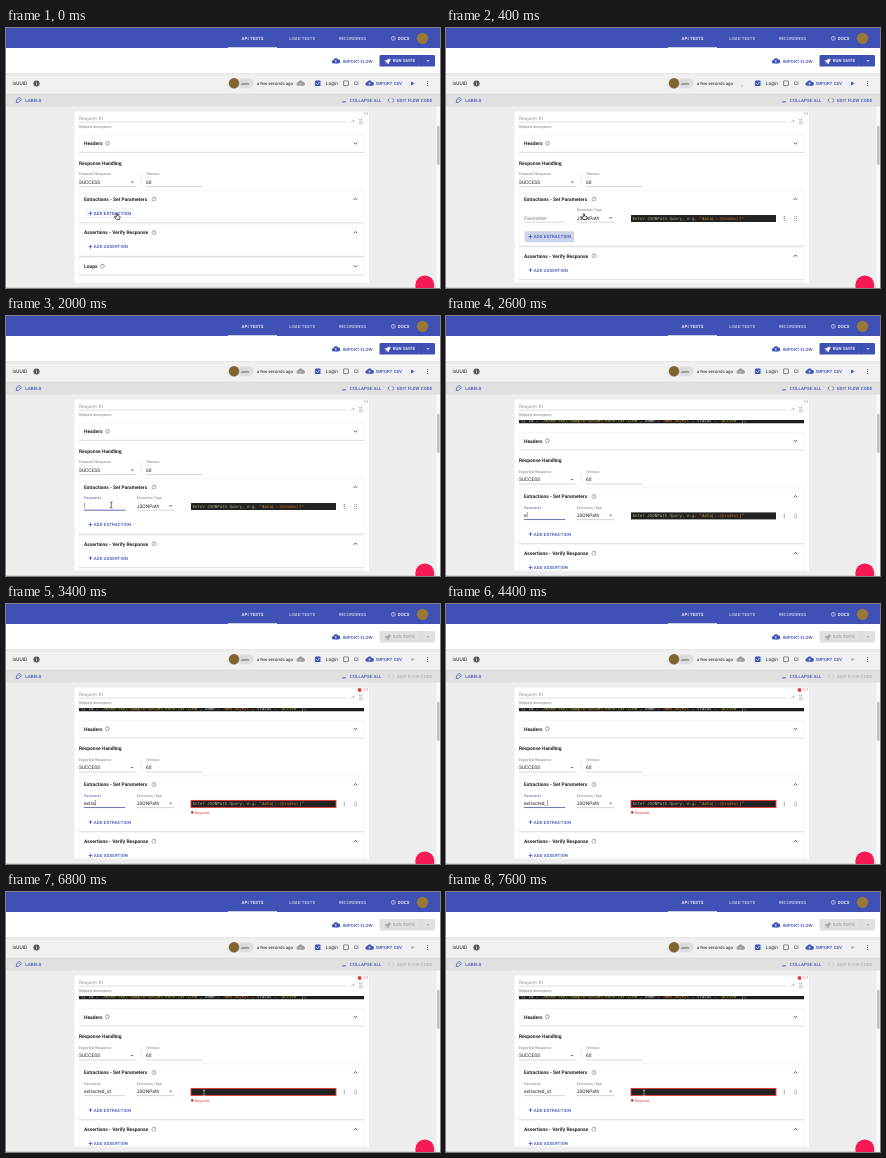
An HTML page that plays this animation: 434 px wide and 260 px high, repeating every 8000 ms.

```html
<!DOCTYPE html>
<html lang="en">
<head>
<meta charset="utf-8">
<title>API test editor</title>
<style>
html, body { margin: 0; width: 100%; height: 100%; overflow: hidden; background: #eee; }
svg { display: block; width: 434px; height: 260px; font-family: Roboto, "Liberation Sans", sans-serif; }
text { white-space: pre; text-rendering: geometricPrecision; }
.btn { font-size: 4.35px; font-weight: 500; letter-spacing: .12px; }
.body { font-size: 4.85px; letter-spacing: .04px; }
.head { font-size: 4.9px; font-weight: 700; }
.note { font-size: 4.35px; }
.label { font-size: 3.6px; letter-spacing: .03px; }
.code { font: 4.12px "DejaVu Sans Mono", "Liberation Mono", monospace; }
</style>
</head>
<body>
<svg id="stage" viewBox="0 0 434 260"></svg>
<script>
const BLUE = '#3f51b5', INK = '#222', GRAY = '#777', RED = '#e53935';
const LOOP = 8000, STEP = 200, ROW_SHIFT = 23.3, PREVIEW_SHIFT = 9.4;
const WORD = 'extracted_id';
const SIZES = { btn: 4.35, body: 4.85, head: 4.9, note: 4.35, label: 3.6, code: 4.12 };

// Text is placed by its left edge and the middle of its capitals.
const text = (cls, x, y, s, fill = INK, extra = '') =>
  `<text class="${cls}" x="${x}" y="${(y + SIZES[cls] * .355).toFixed(2)}" fill="${fill}" ${extra}>${s}</text>`;
const rect = (x, y, w, h, fill, extra = '') =>
  `<rect x="${x}" y="${y}" width="${w}" height="${h}" fill="${fill}" ${extra}/>`;
const path = (d, color, width = .8, extra = '') =>
  `<path d="${d}" fill="none" stroke="${color}" stroke-width="${width}" ${extra}/>`;
const fillPath = (d, fill, extra = '') => `<path d="${d}" fill="${fill}" ${extra}/>`;
const circle = (x, y, r, fill, extra = '') => `<circle cx="${x}" cy="${y}" r="${r}" fill="${fill}" ${extra}/>`;
const group = (id, content, extra = '') => `<g id="${id}" ${extra}>${content}</g>`;

const rule = (x1, x2, y, color = '#999') => path(`M${x1} ${y}H${x2}`, color, .4);
const chevron = (x, y, up) => path(`M${x - 1.7} ${y + (up ? .9 : -.9)}l1.7 ${up ? -1.8 : 1.8}l1.7 ${up ? 1.8 : -1.8}`, '#333', .8);
const dropArrow = (x, y, fill = '#666') => fillPath(`M${x - 1.5} ${y - .7}h3l-1.5 1.6z`, fill);
const play = (x, y, fill) => fillPath(`M${x - 1.4} ${y - 2}l3.4 2l-3.4 2z`, fill);
const rocket = (x, y, fill) =>
  fillPath(`M${x + 2.4} ${y - 2.4}q-2.2 0-3.4 1.5l-1.4.1l-.8 1.3l1.5.3l1.2 1.2l.3 1.5l1.3-.8l.1-1.4q1.4-1.2 1.2-3.7z`, fill) +
  path(`M${x - 2.3} ${y + 2.3}l1.3-1.3`, fill, .8);
const dots = (xs, x, y, fill = '#555') =>
  xs.map(dx => [-1.9, 0, 1.9].map(dy => circle(x + dx, y + dy, .5, fill)).join('')).join('');
const kebab = (x, y) => dots([0], x, y, '#333');
const grip = (x, y) => dots([-.8, .8], x, y, '#777');
const help = (x, y, color = '#666') =>
  circle(x, y, 2, 'none', `stroke="${color}" stroke-width=".5"`) +
  text('label', x, y, '?', color, 'text-anchor="middle"');
const cloud = (x, y, fill, mark) =>
  fillPath(`M${x - 2.2} ${y + 2.4}a1.7 1.7 0 0 1-.2-3.4a2.6 2.6 0 0 1 4.8-.4a1.9 1.9 0 0 1 .3 3.8z`, fill) +
  path(`M${x} ${y}${mark}`, '#fff', .6);
const uploadCloud = (x, y) => cloud(x, y, BLUE, 'm0 1.6v-2.3m-1 1l1-1l1 1');
const plus = (x, y) => path(`M${x - 2} ${y}h4m-2-2v4`, BLUE, .75);
const checkbox = (x, y, on) => on
  ? rect(x - 2.7, y - 2.7, 5.4, 5.4, BLUE, 'rx=".6"') + path(`M${x - 1.6} ${y}l1.2 1.2l2.2-2.5`, '#fff', .7)
  : rect(x - 2.4, y - 2.4, 4.8, 4.8, 'none', 'rx=".4" stroke="#555" stroke-width=".7"');
const panel = (y, h, id = '') =>
  rect(73, y + .7, 285, h, '#cfcfcf', id && `id="${id}Shade"`) +
  rect(73, y, 285, h, '#fff', `stroke="#e8e8e8" stroke-width=".4" ${id && `id="${id}"`}`);
const heading = (y, s, helpX, up) => text('head', 78, y, s) + help(helpX, y) + chevron(349.5, y, up);
const addButton = (y, s) => plus(84.5, y) + text('btn', 87.7, y, s, BLUE);

const chrome = () =>
  rect(0, 0, 434, 260, '#eee') +
  rect(0, 0, 434, 20, BLUE) + rect(222, 19, 49, 1, '#c5cbe9') +
  text('btn', 246.5, 10.3, 'API TESTS', '#fff', 'text-anchor="middle"') +
  text('btn', 296.3, 10.3, 'LOAD TESTS', '#c9cfec', 'text-anchor="middle"') +
  text('btn', 346.5, 10.3, 'RECORDINGS', '#c9cfec', 'text-anchor="middle"') +
  help(387.3, 10.3, '#fff') + text('btn', 391.8, 10.3, 'DOCS', '#fff') + circle(416.5, 10.3, 5.6, '#9a7838') +
  rect(0, 20, 434, 25.5, '#fff') +
  uploadCloud(329.8, 33) + text('btn', 336.7, 33, 'IMPORT FLOW', BLUE) +
  rect(0, 45.5, 434, 20.5, '#f0f0f0') + rule(0, 434, 45.7, '#d4d4d4') +
  text('body', 6.6, 55.5, 'isUUID') + circle(30.5, 55.5, 3, '#555') +
  path('M30.5 55.1v2.1m0-3.5v.7', '#fff', .7) +
  rect(231.5, 50.5, 16, 9.8, '#dcdcdc', 'rx="4.9"') +
  circle(228, 55.3, 5.2, '#80642f') + text('label', 234.7, 55.4, 'Jorin', '#333') +
  text('note', 250.7, 55.4, 'a few seconds ago') +
  group('saved', cloud(294.5, 55.3, '#9a9a9a', 'm-1.1 .6l.8.8l1.5-1.6')) +
  group('saving', rect(295, 57.8, 1.5, .6, '#777')) +
  checkbox(311.8, 55.3, true) + text('body', 319.8, 55.4, 'Login') +
  checkbox(340, 55.3, false) + text('body', 348, 55.4, 'CI') +
  uploadCloud(363.5, 55.3) + text('btn', 369.8, 55.4, 'IMPORT CSV', BLUE) + kebab(421.5, 55.4) +
  rect(0, 66, 434, 12.5, '#e0e0e0') + rule(0, 434, 66, '#d2d2d2') +
  path('M10.2 74.5l.4-2.6l2.6-2.6l2.3 2.3l-2.7 2.6z', BLUE, .7) + circle(13.1, 71.5, .5, BLUE) +
  text('btn', 19.3, 72.3, 'LABELS', BLUE) +
  rect(336, 73.5, 4, .8, BLUE) + text('btn', 344, 72.3, 'COLLAPSE ALL', BLUE) +
  rect(430.5, 78.5, 3.5, 181.5, '#f8f8f8') + rect(431, 98, 2.6, 39, '#c1c1c1', 'rx="1.2"');

const runControls = (id, fill, ink, link) => group(id,
  rect(373.5, 27, 55.5, 11.6, fill, 'rx="1.2"') + path('M415.3 27v11.6', id === 'ready' ? '#2f3d90' : '#c4c4c4', .4) +
  rocket(382, 32.8, ink) + text('btn', 386.7, 32.9, 'RUN SUITE', ink) + dropArrow(422, 32.9, ink) +
  play(406.5, 55.4, link) +
  path('M383.8 70.4l-2 1.9l2 1.9m2.4-3.8l2 1.9l-2 1.9', link, .7) +
  text('btn', 391, 72.3, 'EDIT FLOW CODE', link));

const extractionRow = () => group('row',
  text('body', 78, 190, 'Parameter', '#777', 'id="hint"') +
  text('label', 78, 182.2, 'Parameter', BLUE, 'id="paramLabel"') +
  text('body', 78, 189.8, '', INK, 'id="value"') +
  rect(78.2, 186.6, .4, 5.8, INK, 'id="caret"') +
  rule(78, 119, 194.2) + rect(78, 193.8, 41.3, .7, BLUE, 'id="focusLine"') +
  text('label', 130.7, 182.2, 'Extraction Type', GRAY) + text('body', 130.7, 189.8, 'JSONPath') +
  dropArrow(164.7, 190) + rule(130.7, 168, 194.2) +
  rect(185, 187, 145, 7, '#222', 'id="editor"') +
  text('code', 186.5, 190.6, 'Enter JSONPath Query, e.g. <tspan fill="#c99a3d">"data[</tspan><tspan fill="#d0702f">::(@index)</tspan><tspan fill="#c99a3d">]"</tspan>', '#b3aa86', 'id="query"') +
  group('required', circle(186.3, 199, 1.3, RED) + text('label', 188.8, 199, 'Required', RED)) +
  kebab(338.2, 190.5) + grip(349.6, 190.5));

const form = () => group('lower',
  panel(107, 17) + heading(115.4, 'Headers', 101.5, false) +
  text('head', 73, 135.2, 'Response Handling') +
  text('label', 73, 146.2, 'Expected Response', GRAY) + text('body', 73, 154.2, 'SUCCESS') +
  dropArrow(126.3, 154.3) + rule(73, 130.5, 158.6) + path('M135.3 146v13', '#ddd', .5) +
  text('label', 140, 146.2, 'Timeout', GRAY) + text('body', 140, 154.2, '60') + rule(140, 197, 158.6) +
  panel(162.5, 32, 'extraction') + heading(171, 'Extractions - Set Parameters', 148, true) +
  extractionRow() +
  group('after',
    rect(78.5, 179.9, 49.5, 11, BLUE, 'rx="1" id="ripple"') + addButton(185.3, 'ADD EXTRACTION') +
    panel(196, 32) + heading(204.5, 'Assertions - Verify Response', 148, true) + addButton(218.7, 'ADD ASSERTION') +
    panel(229.7, 17) + heading(238.2, 'Loops', 96.5, false)));

const card = () =>
  `<clipPath id="view"><path d="M0 78.5h430v176.2H0z"/></clipPath><clipPath id="strip"><path d="M73 104h285v3.5H73z"/></clipPath>` +
  `<g clip-path="url(#view)">` +
  rect(68, 83, 295.5, 176, '#fff', 'stroke="#ddd" stroke-width=".5"') +
  text('body', 73, 90, 'Request #1', '#999') + rule(73, 341, 94, '#aaa') +
  text('label', 73, 98.4, 'Request description', GRAY) +
  path('M345.6 93.8l1.5-1.5l1.5 1.5', '#666', .6) + grip(354.6, 93.3) +
  text('label', 357.3, 85.5, '1/1', GRAY, 'id="count"') + circle(353.6, 86, 1.9, RED, 'id="badge"') +
  group('preview', rect(73, 104, 285, 3.5, '#1c1c1c') +
    text('code', 75, 105, '[{ id : <tspan fill="#c9b04d">"26360-test-sample-values-here-for-item"</tspan>, name : <tspan fill="#d58a3b">"New Object"</tspan>, status : <tspan fill="#c9b04d">"active"</tspan> }]', '#ddd'),
    'clip-path="url(#strip)"') +
  form() + '</g>';

const iBeam = 'M-1.3-3q1.3 0 1.3 .9v4.2q0 .9-1.3 .9M1.3-3q-1.3 0-1.3 .9M1.3 3q-1.3 0-1.3-.9';
const pointers =
  group('hand', fillPath('M-.8-2.6q.7-.8 1.3 0v2l2 .5q.6.3.5 1.1l-.5 2h-3.3l-1.8-2.2q.1-.9.9-.5l.9.6z', '#fff', 'stroke="#111" stroke-width=".7"')) +
  group('beam', path(iBeam, 'currentColor', .6)) +
  group('arrow', fillPath('M0-2.5v5l1.2-1l.8 1.8l.9-.4l-.8-1.7h1.6z', '#111', 'stroke="#fff" stroke-width=".3"'));

const stage = document.getElementById('stage');
stage.innerHTML = chrome() + runControls('ready', BLUE, '#fff', BLUE) +
  runControls('blocked', '#e0e0e0', '#a6a6a6', '#b5b5b5') + card() +
  rule(0, 430, 259.6, '#aaa') + circle(418.8, 257, 9.5, '#f51a55') + pointers;

const $ = id => document.getElementById(id);
const show = (id, on) => $(id).setAttribute('display', on ? 'inline' : 'none');
const set = (id, attr, value) => $(id).setAttribute(attr, value);
const move = (id, x, y) => set(id, 'transform', `translate(${x} ${y})`);
const within = (t, a, b) => t >= a && t < b;

// Pointer stops: time, x, y.
const ROUTE = [[0, 111, 188.3], [200, 112, 188.3], [400, 138, 188.6], [600, 134, 189], [1200, 105.3, 189],
  [2600, 105.3, 189], [5400, 106, 190], [5800, 118, 191], [6400, 198, 201]];

function pointerAt(t) {
  const next = ROUTE.findIndex(stop => stop[0] > t);
  if (next < 0) return ROUTE.at(-1).slice(1);
  const [a, b] = [ROUTE[next - 1], ROUTE[next]];
  const k = (t - a[0]) / (b[0] - a[0]);
  const ease = k * k * (3 - 2 * k);
  return [1, 2].map(i => a[i] + (b[i] - a[i]) * ease);
}

function drawPointer(t) {
  const [x, y] = pointerAt(t);
  const visible = t < 2600 || t >= 5400;
  const inEditor = t > 6000 && x > 185;
  const overInput = inEditor || (t < 2600 && x < 120 && t >= 600) || within(t, 5400, 5800);
  const overLink = t < 2600 && !overInput;
  const shape = overInput ? 'beam' : overLink ? 'hand' : 'arrow';
  for (const id of ['hand', 'beam', 'arrow']) show(id, visible && id === shape);
  move(shape, x, y);
  $('beam').style.color = inEditor ? '#ddd' : '#111';
}

function draw(t) {
  const hasRow = t >= 200, typed = t >= 2600, invalid = t >= 2800;
  const focused = within(t, 1400, 6600), editing = t >= 6600;
  const saving = within(t, 200, 1400);

  show('saving', saving);
  show('saved', !saving);
  show('row', hasRow);
  move('after', 0, hasRow ? ROW_SHIFT : 0);
  for (const id of ['extraction', 'extractionShade']) set(id, 'height', 32 + (hasRow ? ROW_SHIFT : 0));
  move('lower', 0, typed ? PREVIEW_SHIFT : 0);
  show('preview', typed);
  set('ripple', 'opacity', t < 200 ? .04 : Math.max(0, .25 - Math.max(0, t - 400) * .0007));

  show('hint', t < 1400);
  show('paramLabel', t >= 1400);
  set('paramLabel', 'fill', focused ? BLUE : GRAY);
  show('focusLine', focused);

  const letters = typed ? Math.floor((t - 2600) / 200) + 1 : 0;
  const value = $('value');
  value.textContent = WORD.slice(0, letters);
  set('caret', 'x', 78.3 + (letters ? value.getComputedTextLength() : 0));
  show('caret', focused && !within(t, 1600, 2000) && !within(t, 5000, 5400) && !within(t, 5800, 6400));

  set('editor', 'stroke', invalid ? RED : 'none');
  set('editor', 'stroke-width', .9);
  show('query', !editing);
  show('required', invalid);
  show('badge', invalid);
  set('count', 'fill', invalid ? RED : GRAY);
  show('ready', !invalid);
  show('blocked', invalid);
  drawPointer(t);
}

const start = performance.now();
function tick() {
  const t = (performance.now() - start) % LOOP;
  draw(Math.floor(t / STEP) * STEP);
  requestAnimationFrame(tick);
}
tick();
</script>
</body>
</html>
```
